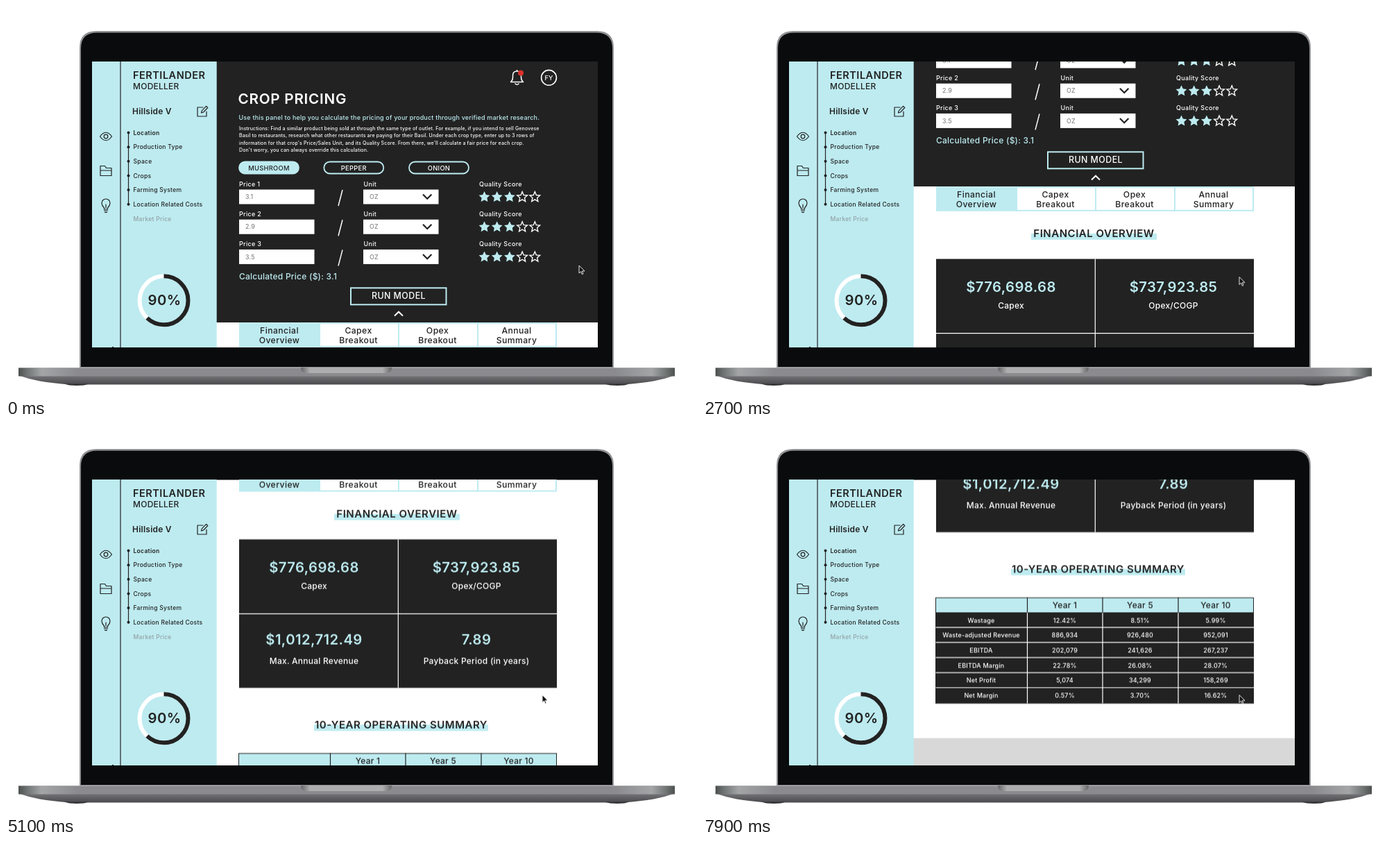
Animation of 996 by 562 pixels, one loop 8000 ms. Source, as an HTML page:

```html
<!DOCTYPE html>
<html lang="en">
<head>
<meta charset="utf-8">
<title>Crop pricing</title>
<style>
  html, body { margin: 0; width: 100%; height: 100%; overflow: hidden; background: #fff; }
  svg { display: block; width: 100%; height: 100%; }
  text { font-family: Inter, "Open Sans", sans-serif; font-weight: 500; letter-spacing: .02em; white-space: pre; }
  .bold { font-weight: 600; }
  .wide { letter-spacing: .035em; }
  .mid { text-anchor: middle; }
  .line { fill: none; stroke: #222; stroke-width: 1.2; stroke-linecap: round; stroke-linejoin: round; }
  #page { animation: scroll 8s infinite; }
  #cursor { animation: point 8s infinite; }

  /* The picture advances every 100 ms, so each stretch is stepped. */
  @keyframes scroll {
    0%     { transform: translateY(0); animation-timing-function: steps(15); }
    18.75% { transform: translateY(0); animation-timing-function: steps(3); }
    22.5%  { transform: translateY(-30px); animation-timing-function: steps(4); }
    27.5%  { transform: translateY(-105px); animation-timing-function: steps(5); }
    33.75% { transform: translateY(-196px); animation-timing-function: steps(5); }
    40%    { transform: translateY(-265px); animation-timing-function: steps(5); }
    46.25% { transform: translateY(-312px); animation-timing-function: steps(3); }
    50%    { transform: translateY(-316.5px); animation-timing-function: steps(2); }
    52.5%  { transform: translateY(-318px); animation-timing-function: steps(4); }
    57.5%  { transform: translateY(-353px); animation-timing-function: steps(5); }
    63.75% { transform: translateY(-394.3px); animation-timing-function: steps(4); }
    68.75% { transform: translateY(-403px); animation-timing-function: steps(4); }
    73.75% { transform: translateY(-432px); animation-timing-function: steps(5); }
    80%    { transform: translateY(-482px); animation-timing-function: steps(4); }
    85%    { transform: translateY(-522.4px); animation-timing-function: steps(4); }
    90%    { transform: translateY(-612px); animation-timing-function: steps(1); }
    91.25%, 100% { transform: translateY(-618.6px); }
  }
  @keyframes point {
    0%, 2.5% { transform: translate(826px, 374px); animation-timing-function: steps(4); }
    7.5%     { transform: translate(808px, 382px); animation-timing-function: steps(3); }
    11.25%   { transform: translate(782px, 389px); animation-timing-function: steps(2); }
    13.75%, 100% { transform: translate(773px, 390.5px); }
  }
</style>
</head>
<body>
<svg viewBox="0 0 996 562" preserveAspectRatio="none">
  <defs>
    <clipPath id="screen"><rect x="124" y="80.5" width="729" height="411.5"/></clipPath>
    <linearGradient id="deck">
      <stop offset="0" stop-color="#4c5150"/><stop offset=".012" stop-color="#6d7271"/>
      <stop offset=".035" stop-color="#a3a5a7"/><stop offset=".09" stop-color="#8b8b8f"/>
      <stop offset=".91" stop-color="#8b8b8f"/><stop offset=".965" stop-color="#a3a5a7"/>
      <stop offset=".988" stop-color="#6d7271"/><stop offset="1" stop-color="#4c5150"/>
    </linearGradient>
    <linearGradient id="under" x2="0" y2="1">
      <stop offset="0" stop-color="#77777b"/><stop offset="1" stop-color="#4a4a4d"/>
    </linearGradient>
    <linearGradient id="notch">
      <stop offset="0" stop-color="#67676a"/><stop offset=".1" stop-color="#adadb0"/>
      <stop offset=".9" stop-color="#adadb0"/><stop offset="1" stop-color="#67676a"/>
    </linearGradient>
  </defs>

  <!-- laptop -->
  <path d="M106 522V60Q106 36 130 36H852Q876 36 876 60V522Z" fill="#929295"/>
  <path d="M108 520V61Q108 38.500 131 38.500H851Q874 38.500 874 61V520Z" fill="#090b0c"/>
  <path d="M18 532H964Q940 542 890 545.500H92Q42 542 18 532Z" fill="url(#under)"/>
  <path d="M84 544.500H119Q114 547 102 547T84 544.500ZM863 544.500H898Q893 547 881 547T863 544.500Z" fill="#333"/>
  <rect x="18" y="521" width="946" height="12.500" fill="url(#deck)"/>
  <rect x="18" y="521" width="946" height="1" fill="#b9b9bc" opacity=".6"/>
  <path d="M425 521H556Q556 529 547 529H434Q425 529 425 521Z" fill="url(#notch)"/>

  <g clip-path="url(#screen)">
    <rect x="124" y="80" width="730" height="413" fill="#fff"/>
    <g id="page"></g>
    <g id="sidebar"></g>
    <g id="cursor">
      <path d="M0 0V11L2.600 8.600L4.300 12.600L6 11.900L4.300 8H8Z" fill="#111" stroke="#fff" stroke-width=".9"/>
    </g>
  </g>
</svg>

<script>
const CYAN = '#bdebf0', DARK = '#222', WHITE = '#fff';

const text = (x, y, size, str, fill = DARK, cls = '') =>
  `<text x="${x}" y="${y}" font-size="${size}" fill="${fill}" class="${cls}">${str}</text>`;
const rect = (x, y, w, h, fill, extra = '') =>
  `<rect x="${x}" y="${y}" width="${w}" height="${h}" fill="${fill}" ${extra}/>`;
const path = (d, stroke, width, extra = '') =>
  `<path d="${d}" fill="none" stroke="${stroke}" stroke-width="${width}" ${extra}/>`;
const each = (list, draw) => list.map(draw).join('');

function star(cx, cy, filled) {
  const points = Array.from({ length: 10 }, (_, i) => {
    const r = (i % 2 ? 3.5 : 7.7) + (filled ? .6 : 0), a = i * Math.PI / 5;
    return `${(cx + r * Math.sin(a)).toFixed(2)},${(cy - r * Math.cos(a)).toFixed(2)}`;
  });
  const paint = filled ? `fill="${CYAN}"` : `fill="none" stroke="${WHITE}" stroke-width="1.4"`;
  return `<polygon points="${points.join(' ')}" ${paint}/>`;
}

function pill(x, label, active) {
  return rect(x, 224.5, 86, 17, active ? CYAN : 'none', `rx="8.500" stroke="${CYAN}" stroke-width="1.800"`) +
    text(x + 43, 237, 9.3, label, active ? DARK : WHITE, 'mid wide');
}

function priceRow(price, i) {
  const y = i * 43.2;
  return `<g transform="translate(0 ${y})">` +
    text(336, 259.5, 9, 'Price ' + (i + 1), WHITE, 'wide') +
    text(515.5, 259.5, 9, 'Unit', WHITE, 'wide') +
    text(682, 259.5, 9, 'Quality Score', WHITE, 'wide') +
    rect(336, 264.5, 108.5, 21, WHITE) + rect(515, 264.5, 108.5, 21, WHITE) +
    text(345, 278.3, 8.8, price, '#858585') + text(524, 278.3, 8.8, 'OZ', '#858585') +
    path('M479 288L485 265', WHITE, 1.5) +
    path('M601 271.500L607.200 277.800L613.400 271.500', DARK, 2.2) +
    each([0, 1, 2, 3, 4], n => star(689.5 + n * 18.2, 275.3, n < 3)) + '</g>';
}

function tab(label, i) {
  const [top, bottom] = label.split(' '), x = [337, 452, 566, 680][i], mid = 394 + i * 114;
  return rect(x, 457.2, [115, 114, 114, 113][i], 33.6, i ? WHITE : CYAN, `stroke="${CYAN}" stroke-width="2"`) +
    text(mid, 472.4, 12.2, top, DARK, 'mid wide') + text(mid, 485.8, 12.2, bottom, DARK, 'mid wide');
}

function heading(x, w, y, label) {
  return rect(x, y - 5.5, w, 9, CYAN) + text(x + w / 2, y, 15, label, DARK, 'mid bold wide');
}

function card([amount, label], i) {
  const x = i % 2 ? 678 : 444, low = i > 1;
  return text(x, low ? 711.7 : 607.6, 20.3, amount, CYAN, 'mid bold') +
    text(x, low ? 739.5 : 632, 12, label, WHITE, 'mid');
}

const centres = [401, 521.5, 630, 739];
function tableRow(row, i) {
  return each(row.split('|'), (cell, c) => text(centres[c], 904.6 + i * 21.7, 9, cell, WHITE, 'mid')) +
    (i ? path(`M335.500 ${890 + i * 21.7}H794`, WHITE, 1.2) : '');
}

const intro = [
  'Instructions: Find a similar product being sold at through the same type of outlet. For example, if you intend to sell Genovese',
  'Basil to restaurants, research what other restaurants are paying for their Basil. Under each crop type, enter up to 3 rows of',
  "information for that crop's Price/Sales Unit, and its Quality Score. From there, we'll calculate a fair price for each crop.",
  "Don't worry, you can always override this calculation."
];
const figures = [
  ['$776,698.68', 'Capex'], ['$737,923.85', 'Opex/COGP'],
  ['$1,012,712.49', 'Max. Annual Revenue'], ['7.89', 'Payback Period (in years)']
];
const summary = [
  'Wastage|12.42%|8.51%|5.99%',
  'Waste-adjusted Revenue|886,934|926,480|952,091',
  'EBITDA|202,079|241,626|267,237',
  'EBITDA Margin|22.78%|26.08%|28.07%',
  'Net Profit|5,074|34,299|158,269',
  'Net Margin|0.57%|3.70%|16.62%'
];

document.getElementById('page').innerHTML =
  rect(303, 80, 551, 376, DARK) +
  // bell and account badge
  path('M727.500 109.500H745.500Q742.500 107 742.500 103V100Q742.500 94 736.500 94T730.500 100V103Q730.500 107 727.500 109.500Z', WHITE, 1.5, 'stroke-linejoin="round"') +
  path('M733.500 111.500Q736.500 115 739.500 111.500M736.500 92V94', WHITE, 1.4) +
  '<circle cx="742" cy="96.500" r="4" fill="#d9302c"/>' +
  `<circle cx="782.500" cy="103.300" r="10.900" fill="none" stroke="${WHITE}" stroke-width="1.600"/>` +
  text(782.5, 106.7, 9.2, 'FY', WHITE, 'mid') +
  // pricing form
  text(334.5, 141, 20.7, 'CROP PRICING', WHITE, 'bold wide') +
  text(335.5, 164.3, 9, 'Use this panel to help you calculate the pricing of your product through verified market research.', CYAN) +
  each(intro, (s, i) => text(336, 179 + i * 10.3, 7, s, WHITE)) +
  pill(336, 'MUSHROOM', true) + pill(458.3, 'PEPPER') + pill(581, 'ONION') +
  each(['3.1', '2.9', '3.5'], priceRow) +
  text(336, 393.6, 12, 'Calculated Price ($): 3.1', CYAN) +
  rect(497, 406.3, 137.5, 24, 'none', `stroke="${CYAN}" stroke-width="2"`) +
  text(566, 422.3, 12.4, 'RUN MODEL', WHITE, 'mid wide') +
  path('M560 446.500L566 440.700L572 446.500', WHITE, 2) +
  each(['Financial Overview', 'Capex Breakout', 'Opex Breakout', 'Annual Summary'], tab) +
  // overview cards
  heading(473, 181, 529.3, 'FINANCIAL OVERVIEW') +
  rect(336, 560.5, 458, 214, DARK) +
  path('M565.300 560.500V774.500M336 667.700H794', WHITE, 1.2) +
  each(figures, card) +
  // ten-year table
  heading(444, 251, 833, '10-YEAR OPERATING SUMMARY') +
  rect(335, 868.5, 459, 153, DARK) +
  rect(336, 869.5, 457, 20.5, CYAN) +
  path('M467.500 868.500V890M576 868.500V890M685 868.500V890', DARK, 1.2) +
  path('M467.500 890.500V1021M576 890.500V1021M685 890.500V1021', WHITE, 1.2) +
  each(['Year 1', 'Year 5', 'Year 10'], (s, i) => text(centres[i + 1], 884.2, 12, s, DARK, 'mid')) +
  each(summary, tableRow) +
  rect(303, 1071.3, 551, 60, '#d8d8d8');

const steps = ['Location', 'Production Type', 'Space', 'Crops', 'Farming System', 'Location Related Costs'];
const ring = 2 * Math.PI * 35;
const icon = d => `<path class="line" d="${d}"/>`;

document.getElementById('sidebar').innerHTML =
  rect(124, 80, 179.7, 413, CYAN) +
  path('M165 80V492', DARK, 1.2) + rect(153, 491, 2, 1, DARK) +
  text(183, 105, 14.5, 'FERTILANDER', DARK, 'bold wide') +
  text(183, 120, 12, 'MODELLER') +
  text(182, 156.2, 12, 'Hillside V', DARK, 'bold') +
  // edit, eye, folder and bulb icons
  icon('M284 146H276V159H289V152M281.500 154L282.300 150.800L288.500 144.300L290.800 146.500L284.600 153Z') +
  icon('M135.500 188Q144 176.500 152.500 188Q144 199.500 135.500 188Z') +
  '<circle class="line" cx="144" cy="188" r="2.800"/>' +
  icon('M136 244.500V230.500H142.500L144.500 233.500H152V244.500ZM136 237H152') +
  icon('M141.500 293V291Q138 287.500 138 284A6 6 0 0 1 150 284Q150 287.500 146.500 291V293ZM141.500 295H146.500M142.500 297.300H145.500M144 291V286') +
  // steps
  path('M176.500 182.500V285.700', DARK, 1.2) +
  each(steps, (s, i) => `<circle cx="176.500" cy="${182.5 + i * 20.64}" r="2" fill="${DARK}"/>` +
    text(183.5, 185.6 + i * 20.64, 8.5, s, DARK, i ? 'wide' : 'wide bold')) +
  text(183.5, 309.6, 8.5, 'Market Price', '#93a3a6', 'wide') +
  // progress ring
  `<circle cx="227.500" cy="424.300" r="35" fill="none" stroke="${WHITE}" stroke-width="6"/>` +
  `<circle cx="227.500" cy="424.300" r="35" fill="none" stroke="${DARK}" stroke-width="6"
    stroke-dasharray="${ring * .62} ${ring}" transform="rotate(-90 227.500 424.300)"/>` +
  text(228.5, 430.7, 20.3, '90%', DARK, 'mid bold');
</script>
</body>
</html>
```
